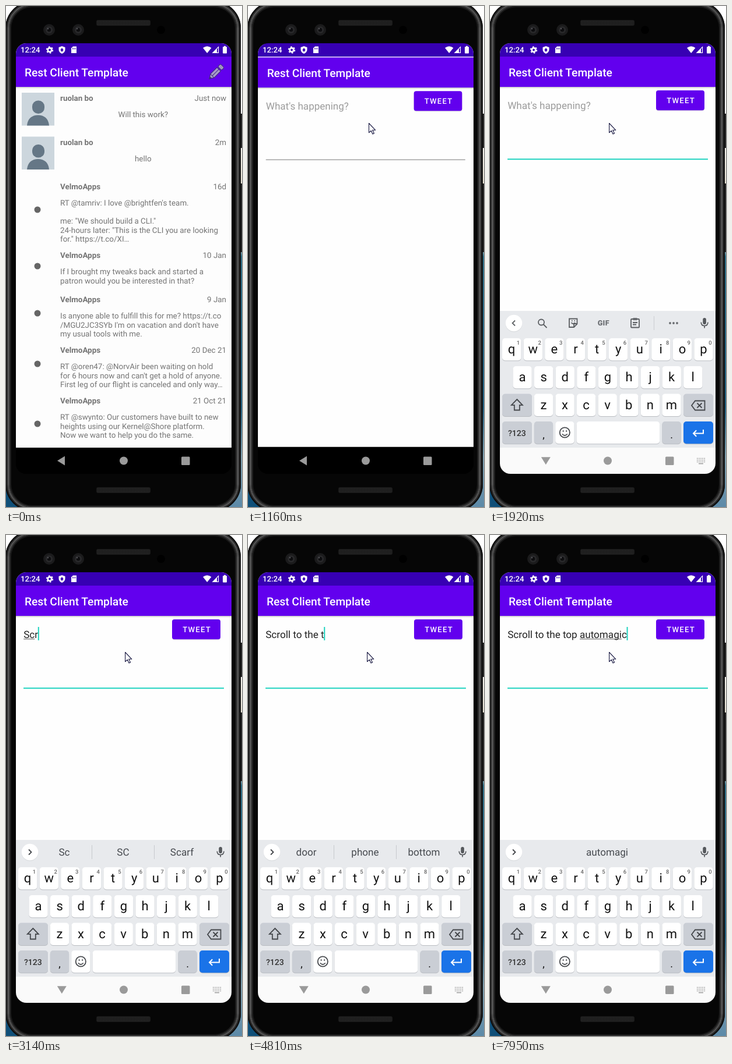
These frames come from a looping animation (405x861 px, 8 s). An HTML page:

```html
<!DOCTYPE html>
<html lang="en">
<head>
<meta charset="utf-8">
<title>Compose screen</title>
<style>
html, body { margin: 0; width: 100%; height: 100%; overflow: hidden; }
svg { display: block; width: 405px; height: 861px; }
text { font-family: Roboto, sans-serif; white-space: pre; text-rendering: geometricPrecision; }
.mid { text-anchor: middle; }
.end { text-anchor: end; }
.row { font-size: 13.4px; fill: #747474; }
.bold { font-weight: 700; }
.clock { font-size: 13.2px; font-weight: 500; fill: #fff; }
.title { font-size: 19.2px; font-weight: 500; fill: #fff; }
.input { font-size: 17.1px; }
.word { font-size: 17.1px; fill: #474b50; text-anchor: middle; }
.key { font-size: 22px; fill: #111; text-anchor: middle; }
.digit { font-size: 9.5px; font-weight: 500; fill: #666; text-anchor: middle; }
.line { fill: none; stroke: #44474b; stroke-width: 1.8; }
</style>
</head>
<body>
<svg id="stage" viewBox="0 0 405 861"></svg>
<script>
const LOOP = 8000;
const MESSAGE = "Scroll to the top automagic";
const KEY_TIMES = [2000, 2530, 3140, 3340, 3550, 3750, 3950, 4280, 4350, 4490, 4550, 4620, 4690, 4740,
  4810, 4950, 5080, 5490, 6020, 6200, 6350, 6560, 6760, 6960, 7290, 7620, 7950];

// time, underline from, underline to, suggestions
const HINTS = [
  [2190, 0, 1, "S So Some"],
  [2730, 0, 2, "Sc SC Scarf"],
  [3270, 0, 3, "Scr Screen Screenshot"],
  [3480, 0, 4, "Scro Scroll Scrolling"],
  [3680, 0, 5, "Scrol Scroll Scrolling"],
  [3820, 0, 6, "Scroll Scrolling Scrolled"],
  [3950, 0, 0, "Scroll Scrolling Scrolled"],
  [4080, 0, 0, "down to through"],
  [4420, 7, 9, "to top too"],
  [4490, 0, 0, "the be get"],
  [4690, 10, 12, "th the that"],
  [4740, 0, 0, "door phone bottom"],
  [4880, 14, 15, "t top time"],
  [5020, 14, 16, "to top town"],
  [5280, 14, 17, "top to topics"],
  [5490, 0, 0, "top to topics"],
  [5690, 0, 0, "of and right"],
  [6120, 18, 19, "a and as"],
  [6270, 18, 20, "a and as"],
  [6480, 18, 21, "aut auto author"],
  [6760, 18, 22, "auto automatic automated"],
  [7090, 18, 23, "autom automated automatic"],
  [7360, 18, 24, "automa automated automatic"],
  [7750, 18, 25, "automag automated automatic"],
  [7950, 18, 26, "automagi"]
];

const rect = (x, y, w, h, fill, r = 0, more = "") =>
  `<rect x="${x}" y="${y}" width="${w}" height="${h}" rx="${r}" fill="${fill}" ${more}/>`;
const circle = (x, y, r, fill, more = "") => `<circle cx="${x}" cy="${y}" r="${r}" fill="${fill}" ${more}/>`;
const path = (d, more = 'class="line"') => `<path d="${d}" ${more}/>`;
const label = (x, y, cls, s, more = "") => `<text x="${x}" y="${y}" class="${cls}" ${more}>${s}</text>`;

function phone() {
  const ring = (inset, width, color) => rect(-1 + inset, -8 + inset, 404 - 2 * inset, 876 - 2 * inset,
    "none", 46 - inset, `stroke="${color}" stroke-width="${width}"`);
  const lens = x => circle(x, 41, 10, "#1b1b1c") + circle(x, 41, 6, "#29292b") +
    circle(x, 41, 3.2, "#0d0d0f") + circle(x - 2, 39, 1.2, "#55555a");
  const grille = y => rect(155, y, 93, 10, "#1c1c1c", 3) +
    [2.5, 5, 7.5].map(d => path(`M157 ${y + d}h89`,
      'stroke="#303030" stroke-width="1" stroke-dasharray="1 1.5"')).join("");
  return rect(0, 0, 405, 861, "url(#backdrop)") +
    rect(0, 800, 200, 61, "#0f4f78") + rect(180, 855, 50, 6, "#14486c") +
    rect(402, 185, 3, 59, "#222") + rect(402, 305, 3, 118, "#222") +
    rect(-1, -8, 404, 876, "#060606", 46) +
    ring(1, 2, "#0e0e0e") + ring(3, 2, "#2c2c2c") + ring(5, 2, "#5a5a5a") +
    ring(7, 2, "#3a3a3a") + ring(9, 2, "#1a1a1a") +
    grille(24) + grille(827) + lens(74) + lens(124) + circle(266, 41, 7, "#000");
}

function statusBar() {
  const white = 'fill="#fff"';
  return rect(17, 64, 370, 23, "#3700b3") +
    label(25, 80, "clock", "12:24") +
    circle(75, 75.5, 3.3, "none", 'stroke="#fff" stroke-width="2.8"') +
    circle(75, 75.5, 5.3, "none", 'stroke="#fff" stroke-width="1.8" stroke-dasharray="2.7 2.85"') +
    path("M96 69l5.5 2v4q0 4.5-5.5 7q-5.5-2.5-5.5-7v-4z", white) +
    path("M96 72l2.6 3.5l-2.6 3.5l-2.6-3.5z", 'fill="#3700b3"') +
    path("M115 69.5h6v11.5h-9v-8.5z", white) +
    path("M114.5 72v2.5m2.3-2.5v2.5m2.3-2.5v2.5", 'stroke="#3700b3"') +
    path("M338 72q7.2-5.5 14.4 0l-7.2 9z", white) +
    path("M355 80.4h9.5v-10z", 'fill="none" stroke="#fff" stroke-width="1.2"') +
    path("M354 81h8v-8z", white) +
    rect(372, 70, 7, 11.5, "#fff", 1) + rect(374, 68.7, 3, 2, "#fff");
}

const appBar = () => rect(0, 87, 405, 52, "#6200ee") + rect(0, 139, 405, 3, "url(#shade)") +
  label(32, 121, "title", "Rest Client Template");

function listScreen() {
  const avatar = y => `<g transform="translate(27 ${y})">` + rect(0, 0, 56, 56.5, "#ccd6dd") +
    rect(18, 13.5, 21, 22.5, "#657786", 10) +
    path("M9 56.5C10 44 18 38.5 28 38.5S46 44 47 56.5z", 'fill="#657786"') + "</g>";
  const mark = y => circle(54, y, 5.5, "#666");
  const head = (y, name, when) => label(93, y, "row bold", name) + label(378, y, "row end", when);
  const body = (y, lines) => lines.map((s, i) => label(93, y + 15.5 * i, "row", s)).join("");
  const team = "VelmoApps", person = "ruolan bo";
  const posts = [
    [315, 350, "16d", ["RT @tamriv: I love @brightfen's team.", "", 'me: "We should build a CLI."',
      '24-hours later: "This is the CLI you are looking', 'for." https://t.co/XI…']],
    [433, 447, "10 Jan", ["If I brought my tweaks back and started a", "patron would you be interested in that?"]],
    [509, 528, "9 Jan", ["Is anyone able to fulfill this for me? https://t.co",
      "/MGU2JC3SYb I'm on vacation and don't have", "my usual tools with me."]],
    [596, 615, "20 Dec 21", ["RT @oren47: @NorvAir been waiting on hold",
      "for 6 hours now and can't get a hold of anyone.", "First leg of our flight is canceled and only way…"]],
    [683, 718, "21 Oct 21", ["RT @swynto: Our customers have built to new",
      "heights using our Kernel@Shore platform.", "Now we want to help you do the same."]]
  ];
  const pencil = '<g transform="translate(349 125) rotate(-45)" stroke="#3f2a80" stroke-width="1">' +
    path("M0 0l7-4.5h16v9h-16z", 'fill="#a79ac9"') + path("M7 0h16M7-4.5v9", 'fill="none"') +
    rect(25, -4.5, 6.5, 9, "#a094c0", 2) + path("M0 0l3-2v4z", 'fill="#43356b"') + "</g>";
  return rect(17, 64, 370, 695, "#fdfdfd") + appBar() +
    circle(360, 113, 24, "#fff", 'id="ripple"') + pencil +
    avatar(149) + head(163, person, "Just now") + label(235.3, 191, "row mid", "Will this work?") +
    avatar(224.5) + head(239, person, "2m") + label(235.3, 267, "row mid", "hello") +
    posts.map(([y, dot, when, lines]) => mark(dot) + head(y, team, when) + body(y + 28, lines)).join("");
}

function composeScreen() {
  return rect(0, 64, 405, 695, "#fefefe") + appBar() +
    rect(285, 146, 83, 34.3, "#000", 4, 'opacity=".14"') + rect(285, 145, 83, 34.3, "#6200ee", 4) +
    label(327.6, 167, "mid", "TWEET", 'font-size="13.2" font-weight="500" fill="#fff" letter-spacing="1.2"') +
    rect(30, 263, 343.5, 1, "#777", 0, 'id="rule"') +
    label(30.2, 176.5, "input", "What's happening?", 'id="hint" fill="#9c9c9c"') +
    label(30.2, 176.5, "input", "", 'id="typed" fill="#222"') +
    rect(30, 178.3, 0, 1, "#555", 0, 'id="mark"') +
    rect(30, 158, 2, 23, "#1fd3bf", 0, 'id="caret"');
}

function keyboard() {
  const pitch = 36.6;
  const cap = (x, y, w, fill = "#fff") => rect(x, y + 1, w, 38.3, "#b9bcc1", 5) + rect(x, y, w, 38.3, fill, 5);
  const row = (s, x, y, digits = "") => [...s].map((c, i) => {
    const left = x + i * pitch;
    return cap(left, y, 32.3) + label(left + 16.1, y + 26, "key", c) +
      (digits ? label(left + 27.5, y + 10.5, "digit", digits[i]) : "");
  }).join("");
  const grey = "#caced5";
  const mic = rect(365.3, 536, 5.6, 11, "#55585c", 2.8) +
    path("M362.3 543.5q0 6 5.8 6t5.8-6M368.1 549v4.5", 'fill="none" stroke="#55585c" stroke-width="1.7"');
  const divider = x => rect(x, 533, 1, 24, "#c6c9cd");
  const tools = '<g id="tools" opacity=".85">' + path("M43 540.5l-4.5 4.5l4.5 4.5") +
    circle(88, 543.5, 5, "none", 'class="line"') + path("M91.5 547l6 6") +
    path("M136 537.5h13.5v9l-5.5 5.5h-8zM149 546h-5v5") +
    path("M139.5 544q3 4 6.5 0M140 541h1.5m3 0h1.5") +
    label(194.8, 549.3, "mid", "GIF", 'font-size="12.5" font-weight="900" fill="#55585c" letter-spacing=".4"') +
    rect(242, 538, 14, 14.5, "none", 1, 'class="line"') + rect(245.5, 536, 7, 4, "#55585c") +
    path("M245 544h8m-8 3.5h6") + divider(281) +
    [309, 315, 321].map(x => circle(x, 545, 1.9, "#55585c")).join("") + "</g>";
  const words = '<g id="words">' + path("M39 540.5l4.5 4.5l-4.5 4.5") +
    '<g id="dividers">' + divider(147) + divider(254) + "</g>" +
    [100, 201, 302].map(x => label(x, 551.3, "word", "")).join("") + "</g>";
  return rect(17, 524, 370, 235, "#e8eaed") + rect(17, 759, 370, 45, "#fafafa") +
    circle(41, 546, 14.3, "#d5d8db") + circle(41, 545, 14.3, "#fff") + tools + words + mic +
    row("qwertyuiop", 21, 571, "1234567890") + row("asdfghjkl", 39.4, 619) + row("zxcvbnm", 75.8, 666.6) +
    cap(21, 666.6, 51, grey) + path("M46.3 676l9.5 9.8h-5v8.7h-9v-8.7h-5z") +
    cap(332, 666.6, 51, grey) + path("M346 686.5l6-8h16.5v16h-16.5zM355.5 682.5l8 8m0-8l-8 8") +
    cap(21, 714, 51, grey) + label(46.3, 738.8, "mid", "?123", 'font-size="14" font-weight="500" fill="#333"') +
    cap(75.8, 714, 32.3, grey) + label(92, 743, "key", ",", 'style="font-size:18px"') +
    cap(112.2, 714, 32.3) + circle(128.3, 733, 8.6, "none", 'class="line"') +
    path("M123.8 735.5q4.5 5 9 0M124.6 730.5h2.2m3.2 0h2.2") +
    cap(148.6, 714, 142.5) +
    cap(295.4, 714, 32.3, grey) + label(311.5, 743, "key", ".", 'style="font-size:18px"') +
    cap(332, 714, 51, "#1a73e8") + path("M366 728v6.5h-17m5.2-5.2l-5.2 5.2l5.2 5.2", 'fill="none" stroke="#fff" stroke-width="2"') +
    [777.5, 780.5, 783.5].map(y => path(`M355 ${y}h14`, 'stroke="#999" stroke-width="1.5" stroke-dasharray="1.6 1.5"')).join("") +
    path("M358 786.5h8", 'stroke="#999" stroke-width="1.3"');
}

const stage = document.getElementById("stage");
stage.innerHTML = `<defs>
  <clipPath id="screen">${rect(17, 64, 370, 740, "#000", 18)}</clipPath>
  <linearGradient id="shade" x2="0" y2="1"><stop stop-color="#000" stop-opacity=".22"/>
    <stop offset="1" stop-color="#000" stop-opacity="0"/></linearGradient>
  <linearGradient id="backdrop" x2="0" y2="1"><stop stop-color="#fff"/><stop offset=".25" stop-color="#f8f8f6"/>
    <stop offset=".35" stop-color="#e4dfd2"/><stop offset=".48" stop-color="#d8d4c8"/>
    <stop offset=".5" stop-color="#2d6e86"/><stop offset=".8" stop-color="#1f5f80"/>
    <stop offset=".9" stop-color="#7f9fae"/><stop offset="1" stop-color="#5d8aa8"/></linearGradient></defs>` +
  phone() + '<g clip-path="url(#screen)">' + rect(17, 64, 370, 740, "#000") +
  `<g id="list">${listScreen()}</g><g id="compose">${composeScreen()}</g>` + statusBar() +
  rect(17, 759, 370, 45, "#000") +
  `<g id="keyboard">${keyboard()}</g>` + rect(17, 759, 370, 45, "#000", 0, 'id="dim"') +
  '<g id="nav">' + path("M88 781.5l13-8v16z", 'id="back" fill="#9a9a9a"') +
  circle(202, 781.5, 7, "#9a9a9a") + rect(301, 774.5, 14.5, 14.5, "#9a9a9a", 1.5) + "</g></g>" +
  path("M0 0v16.2l3.7-3.4l2.7 5.8l2.5-1.1l-2.7-5.7h5z",
    'id="cursor" fill="#fff" stroke="#15153f" stroke-width="1.1" stroke-linejoin="round"');

const part = {};
stage.querySelectorAll("[id]").forEach(el => part[el.id] = el);
const words = [...part.words.querySelectorAll(".word")];
const pen = document.createElement("canvas").getContext("2d");
pen.font = "17.1px Roboto, sans-serif";
const edge = n => 30.2 + pen.measureText(MESSAGE.slice(0, n)).width;

const set = (el, attrs) => { for (const k in attrs) el.setAttribute(k, attrs[k]); };
const show = (el, on) => set(el, { visibility: on ? "visible" : "hidden" });
const clamp = v => Math.max(0, Math.min(1, v));

// Linear path through [time, value] pairs
function track(t, ...pts) {
  let value = pts[0][1];
  for (let i = 1; i < pts.length; i++) {
    const [a, from] = pts[i - 1], [b, to] = pts[i];
    if (t >= a) value = from + (to - from) * clamp((t - a) / (b - a));
  }
  return value;
}

function drawWindows(t) {
  const open = clamp((t - 890) / 410);
  const scale = 1 - 0.1 * (1 - open) ** 3;
  show(part.list, t < 1050);
  show(part.ripple, t > 700 && t < 1050);
  set(part.ripple, { r: track(t, [700, 6], [860, 24]), opacity: 0.22 });
  set(part.compose, {
    opacity: clamp((t - 870) / 100),
    transform: `translate(202 434) scale(${scale}) translate(-202 -434)`
  });
  const rise = clamp((t - 1440) / 270);
  set(part.keyboard, { transform: `translate(0 ${280 * (1 - rise) ** 2})` });
  show(part.keyboard, t >= 1440);
  set(part.dim, { opacity: track(t, [1440, 1], [1580, 0.18], [1710, 0]) });
  set(part.nav, { opacity: track(t, [1440, 1], [1580, 0.4], [1800, 1]) });
  set(part.back, { transform: `rotate(${track(t, [1500, 0], [1850, -90])} 95.3 781)` });
}

function drawTyping(t) {
  const count = KEY_TIMES.filter(k => k <= t).length;
  const hint = HINTS.filter(h => h[0] <= t).pop();
  const focused = t >= 1380;
  part.typed.textContent = MESSAGE.slice(0, count);
  show(part.hint, count === 0);
  show(part.caret, focused && !(t > 1880 && t < 2000));
  set(part.caret, { x: edge(count) - (count ? 0.3 : 0.2) });
  set(part.rule, focused
    ? { y: 262.3, height: 2, width: 344, fill: "#1fd3bf" }
    : { y: 263, height: 1, width: 343.5, fill: "#777" });
  const from = hint ? edge(hint[1]) : 30, to = hint ? edge(hint[2]) : 30;
  set(part.mark, { x: from, width: to - from });
  const up = t >= 1440;
  show(part.tools, up && !hint);
  show(part.words, up && hint);
  const list = hint ? hint[3].split(" ") : [];
  const single = list.length === 1;
  words.forEach((el, i) => el.textContent = (single ? ["", list[0], ""] : list)[i] || "");
  show(part.dividers, up && hint && !single);
}

function drawCursor(t) {
  const x = track(t, [130, 374], [420, 356], [950, 356], [1130, 207.5], [1300, 207.5], [1380, 204.6]);
  const y = track(t, [130, 150], [420, 112], [950, 112], [1130, 201.5]);
  show(part.cursor, t >= 130);
  set(part.cursor, { transform: `translate(${x} ${y})` });
}

function frame() {
  const t = performance.now() % LOOP;
  drawWindows(t);
  drawTyping(t);
  drawCursor(t);
  requestAnimationFrame(frame);
}
frame();
</script>
</body>
</html>
```
